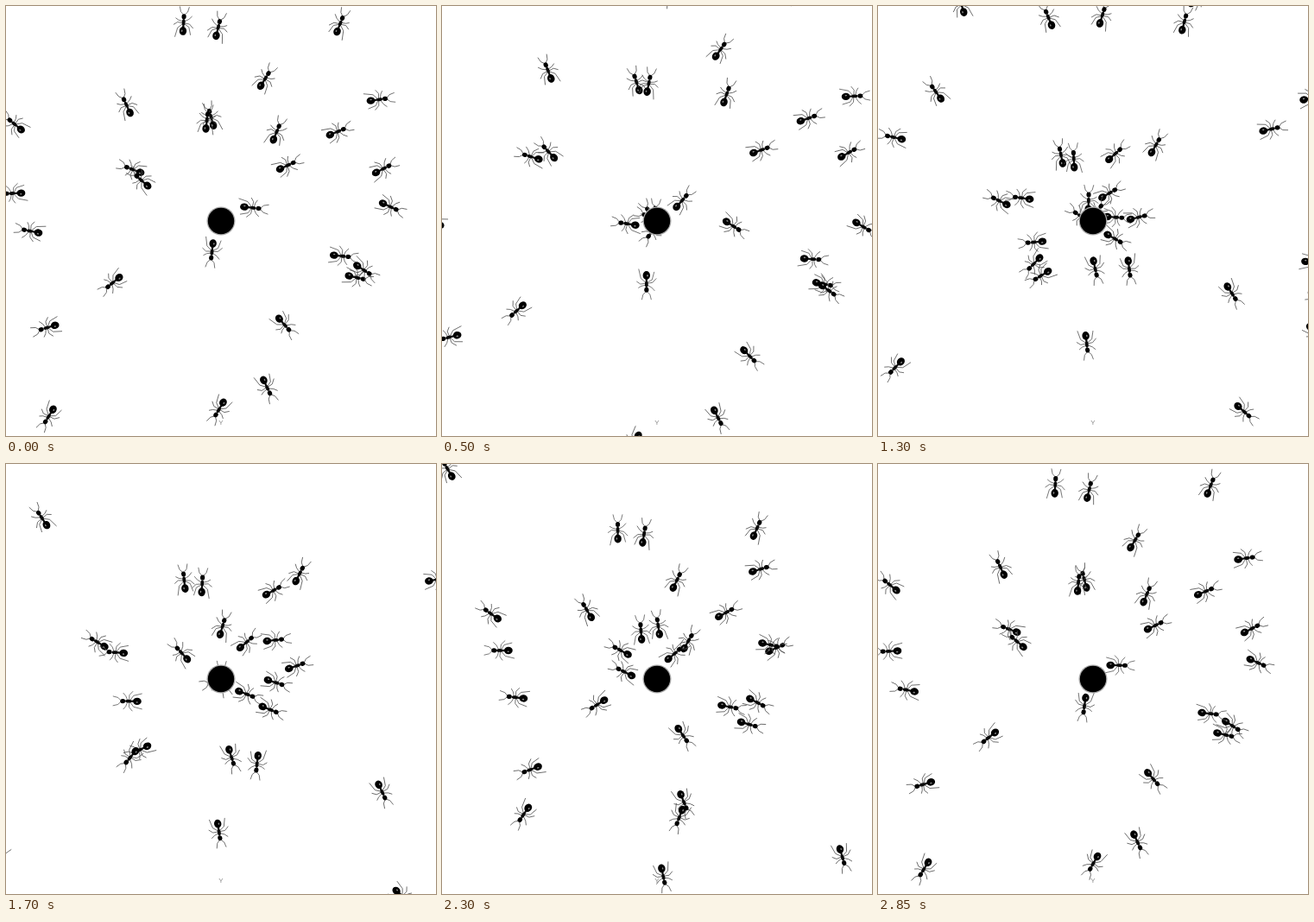
An HTML page with a canvas that plays this animation: 498x498 px, repeating every 2.9 s.

```html
<!DOCTYPE html>
<html lang="en">
<head>
<meta charset="utf-8">
<title>Ants leaving a hole</title>
<style>
  html, body { margin: 0; width: 100%; height: 100%; overflow: hidden; background: #fff; }
  canvas { display: block; width: 498px; height: 498px; }
</style>
</head>
<body>
<canvas id="stage" width="498" height="498"></canvas>
<script>
const ctx = document.getElementById('stage').getContext('2d');
const LOOP = 2900, STEP = 50, CENTER = 249, RAD = Math.PI / 180;
const GAP = 30;       // ms between the ants of one group
const MID = 110;      // distance at which a bearing is measured
const TURN = { left: -10, right: 15, sharp: 33 };  // degrees per e-fold of distance

// Ants come out in small groups; each lists bearings in degrees by way of turning
const groups = [
  { birth: 45, speed: 93, left: [-50], right: [-168] },
  { birth: 303, right: [137, -112], sharp: [-62] },
  { birth: 354, speed: 95, left: [-164.5] },
  { birth: 440, right: [-101.5, 166.5], sharp: [68] },
  { birth: 624, speed: 132, left: [141.5] },
  { birth: 640, speed: 88, left: [80.5, -12] },
  { birth: 882, speed: 97, sharp: [-24] },
  { birth: 883, speed: 84, left: [27] },
  { birth: 978, right: [12, -79.5] },
  { birth: 1110, speed: 96, right: [-136, -44] },
  { birth: 1300, left: [19] },
  { birth: 1622, speed: 112, left: [153, 61] },
  { birth: 1657, speed: 96, left: [-94.5], right: [-99] },
  { birth: 1754, speed: 105, left: [-57, -149] },
  { birth: 1925, speed: 105, right: [-152, -38.5] },
  { birth: 2475, speed: 84, left: [95.5] },
  { birth: 2560, speed: 113, sharp: [11] }
];

const ants = groups.flatMap(({ birth, speed = 90.5, ...ways }) =>
  Object.entries(ways)
    .flatMap(([way, bearings]) => bearings.map(bearing => ({ bearing, turn: TURN[way] })))
    .map((ant, i) => ({ ...ant, speed, birth: birth + i * GAP })));

// The walk starts a little slow and catches up over the rest of the loop
function walkTime(t) {
  const slowEnd = 500, slowWalk = 435;
  return t < slowEnd
    ? t * slowWalk / slowEnd
    : LOOP - (LOOP - t) * (LOOP - slowWalk) / (LOOP - slowEnd);
}

// Each path is a logarithmic spiral out of the hole
function pose({ speed, bearing, turn }, age) {
  const r = speed * age / 1000;
  const angle = (bearing + turn * Math.max(Math.log(r / MID), -1.6)) * RAD;
  return {
    x: CENTER + r * Math.cos(angle),
    y: CENTER + r * Math.sin(angle),
    heading: angle + Math.atan(turn * RAD)
  };
}

function oval(x, y, rx, ry, color) {
  ctx.fillStyle = color;
  ctx.beginPath();
  ctx.ellipse(x, y, rx, ry, 0, 0, 2 * Math.PI);
  ctx.fill();
}

function limb(side, swing, points) {
  ctx.beginPath();
  points.forEach(([x, y], i) => ctx.lineTo(side * x, y + swing * i));
  ctx.stroke();
}

function drawAnt({ x, y, heading }, age) {
  ctx.save();
  ctx.translate(x, y);
  ctx.rotate(heading + Math.PI / 2);
  ctx.lineJoin = 'round';
  ctx.lineWidth = 0.75;
  ctx.strokeStyle = '#505050';
  for (const side of [-1, 1]) {
    const swing = side * Math.sin(age / 200 * 2 * Math.PI) * 0.9;
    limb(side, swing, [[1, -3], [6, -5], [9.5, -8]]);
    limb(side, -swing, [[1, -1], [7, -1], [11.5, 3]]);
    limb(side, swing, [[1, 0], [6.5, 4], [9, 14]]);
    limb(side, 0, [[1, -11], [4, -14], [5.5, -20]]);
  }
  oval(0, 2.5, 1.2, 2.5, '#111');
  oval(0, -2, 1.9, 3.7, '#0a0a0a');
  oval(0, -8.5, 2.6, 3, '#000');
  oval(0, 8.2, 4.2, 4.9, '#000');
  oval(-1.2, 8, 0.8, 1.2, '#888');
  ctx.restore();
}

function draw(t) {
  const now = walkTime(t);
  ctx.fillStyle = '#fff';
  ctx.fillRect(0, 0, 498, 498);
  ctx.fillStyle = '#888';
  ctx.font = '8px "Liberation Sans", sans-serif';
  ctx.textAlign = 'center';
  ctx.fillText('Y', CENTER, 485);

  for (const ant of ants) {
    const age = (now - ant.birth + LOOP) % LOOP;
    // The previous walk may still be leaving the stage
    for (const a of [age, age + LOOP]) {
      if (a > 0) drawAnt(pose(ant, a), a);
    }
  }

  oval(CENTER, CENTER, 16.5, 16.5, '#aaa');
  oval(CENTER, CENTER, 15.2, 15.2, '#000');
}

const start = performance.now();
function tick() {
  const t = (performance.now() - start) % LOOP;
  draw(Math.floor(t / STEP) * STEP);
  requestAnimationFrame(tick);
}
tick();
</script>
</body>
</html>
```
